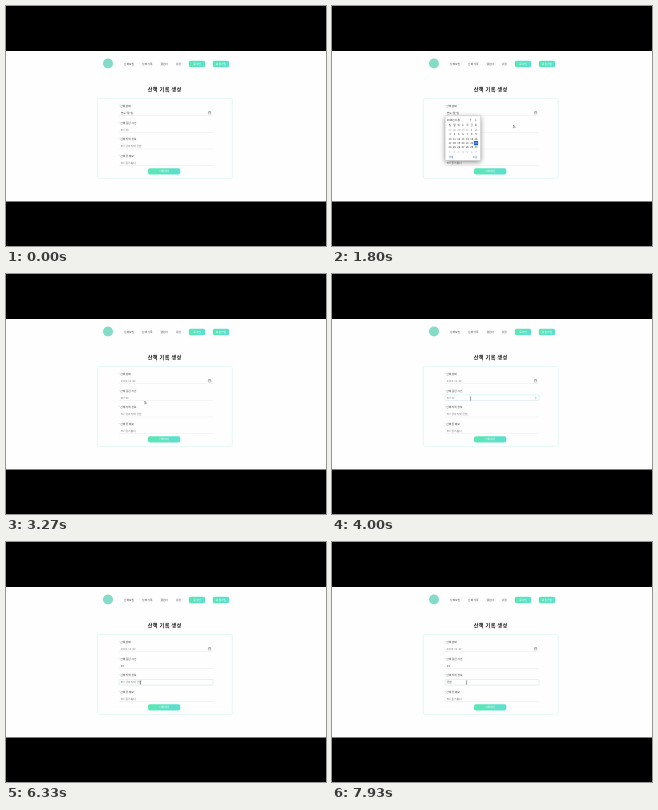
Recreate the animation shown at these times as an HTML page with a canvas. Size 320x240 px, loop 8 s.

```html
<!DOCTYPE html>
<html lang="ko">
<head>
<meta charset="utf-8">
<style>
html, body { margin: 0; width: 100%; height: 100%; overflow: hidden; background: #000; }
canvas { display: block; width: 320px; height: 240px; }
</style>
</head>
<body>
<canvas id="stage" width="320" height="240"></canvas>
<script>
const ctx = document.getElementById('stage').getContext('2d');
const LOOP = 8000;
const INK = '#333', MUTED = '#777', BLUE = '#1a5fd0';
const FONT = '"Noto Sans CJK KR", "Noto Sans CJK", "Noto Sans", sans-serif';

// Pointer stops: time, x, y
const pointerPath = [
  [0, 220, 112], [500, 204, 107], [1000, 204, 107], [1800, 181.5, 120.5],
  [2450, 139.5, 137], [2900, 139.5, 137], [3500, 138.5, 124.5],
  [5700, 138.5, 124.5], [6150, 134.5, 140.5], [8000, 134.5, 140.5]
];

function text(value, x, y, size, color = INK, align = 'left', weight = 400, spacing = 0) {
  ctx.font = `${weight} ${size}px ${FONT}`;
  ctx.letterSpacing = `${spacing}px`;
  ctx.textAlign = align;
  ctx.textBaseline = 'middle';
  ctx.fillStyle = color;
  ctx.fillText(value, x, y);
}

function box(x, y, w, h, r, fill, stroke, line = 0.6) {
  ctx.beginPath();
  ctx.roundRect(x, y, w, h, r);
  if (fill) { ctx.fillStyle = fill; ctx.fill(); }
  if (stroke) { ctx.strokeStyle = stroke; ctx.lineWidth = line; ctx.stroke(); }
}

function button(label, x, y, w, h) {
  const fill = ctx.createLinearGradient(x, y, x + w, y);
  fill.addColorStop(0, '#5ce6b4');
  fill.addColorStop(1, '#5cdfd0');
  box(x, y, w, h, 1.8, fill);
  text(label, x + w / 2, y + h / 2, 2.8, '#fff', 'center', 500);
}

function header() {
  ctx.beginPath();
  ctx.arc(102, 57.5, 5, 0, Math.PI * 2);
  ctx.fillStyle = '#84dcc8';
  ctx.fill();
  [['산책모임', 118], ['산책 기록', 136], ['캘린더', 154.5], ['상점', 169.8]]
    .forEach(([label, x]) => text(label, x, 57.9, 2.7, '#444'));
  button('로그인', 182.8, 54.8, 16.4, 6.4);
  button('회원가입', 206.8, 54.8, 16.4, 6.4);
}

function field(label, y, value, color, focused) {
  text('*', 112.6, y - 7, 2.5, '#5cbcae');
  text(label, 114.2, y - 7.2, 2.6, INK, 'left', 500, 0.1);
  if (focused) box(113, y - 2.9, 94, 5.6, 0.8, '#fff', '#c4eeee');
  ctx.fillStyle = '#eee';
  ctx.fillRect(113, y + 2.3, 94, 0.6);
  text(value, 114.8, y, 2.7, color, 'left', 400, 0.1);
}

function form(t) {
  box(91.3, 92.3, 135, 80, 2, null, '#d8f6f2', 0.7);
  const minutes = t < 5250 ? '' : t < 5650 ? '3' : '30';
  const place = t < 7000 ? '' : t < 7500 ? '공' : '공원';
  const editingMinutes = t >= 3600 && t < 6150;
  field('산책 날짜', 107, t < 2900 ? '연도-월-일' : '2024-11-22', t < 2900 ? '#444' : MUTED);
  field('산책 걸린 시간', 123.8, minutes || 'ex) 30', minutes ? INK : MUTED, editingMinutes);
  field('산책 지역 정보', 140.4, place || 'ex) 강아지와 공원', place ? INK : MUTED, t >= 6150);
  field('산책 중 메모', 157, 'ex) 즐거웠다', MUTED);

  box(202.4, 105.8, 2.4, 2.2, 0.2, null, '#777', 0.4);
  ctx.fillStyle = '#777';
  ctx.fillRect(202.4, 105.6, 2.4, 0.7);
  if (editingMinutes) text('↕', 204, 123.8, 2.8, '#777', 'center');

  button('기록하기', 142, 162.2, 32.3, 6.3);
}

function calendar(t) {
  ctx.save();
  ctx.shadowColor = '#0007';
  ctx.shadowBlur = 5;
  ctx.shadowOffsetY = 1.5;
  box(113.2, 109.7, 35.3, 44.8, 0.8, '#fff');
  ctx.restore();
  box(113.2, 109.7, 35.3, 44.8, 0.8, null, '#c6c6c6', 0.4);
  text('2024년 11월', 115, 113.8, 2.4, '#222', 'left', 500);
  text('↑', 139, 113.8, 2.8, INK, 'center');
  text('↓', 144, 113.8, 2.8, INK, 'center');

  const columnX = i => 118 + i * 4.33;
  [...'일월화수목금토'].forEach((day, i) => text(day, columnX(i), 119.2, 2.5, INK, 'center', 500));
  const hovered = t >= 2400;
  for (let i = 0; i < 42; i++) {
    const x = columnX(i % 7), y = 123.7 + Math.floor(i / 7) * 4.45;
    const day = i - 4, inMonth = day > 0 && day <= 30;
    const shown = day < 1 ? day + 31 : day > 30 ? day - 30 : day;
    const selected = day === 23, active = hovered && day === 22;
    if (selected || active) box(x - 2.1, y - 2.1, 4.2, 4.2, 0.5, active ? '#7d9fe0' : BLUE);
    text(shown, x, y, 2.6, selected || active ? '#fff' : inMonth ? '#222' : '#999', 'center', 500);
  }
  text('삭제', 119, 151.5, 2.4, BLUE, 'center');
  text('오늘', 143, 151.5, 2.4, BLUE, 'center');
}

function pointer(t) {
  const next = Math.max(1, pointerPath.findIndex(stop => stop[0] > t));
  const [t0, x0, y0] = pointerPath[next - 1], [t1, x1, y1] = pointerPath[next];
  const p = (t - t0) / (t1 - t0), e = p * p * (3 - 2 * p);
  const x = x0 + (x1 - x0) * e, y = y0 + (y1 - y0) * e;
  ctx.strokeStyle = '#555';
  ctx.lineWidth = 0.45;
  if (t >= 3400) {
    ctx.beginPath();
    ctx.moveTo(x - 0.7, y - 1.6); ctx.lineTo(x + 0.7, y - 1.6);
    ctx.moveTo(x, y - 1.6); ctx.lineTo(x, y + 1.6);
    ctx.moveTo(x - 0.7, y + 1.6); ctx.lineTo(x + 0.7, y + 1.6);
    ctx.stroke();
  } else if (t > 250) {
    ctx.beginPath();
    ctx.moveTo(x, y - 1.5); ctx.lineTo(x, y + 1.5); ctx.lineTo(x + 0.8, y + 0.8);
    ctx.lineTo(x + 1.8, y + 0.8); ctx.closePath();
    ctx.fillStyle = '#fff';
    ctx.fill();
    ctx.stroke();
  }
}

function draw(now) {
  const t = now % LOOP;
  ctx.fillStyle = '#000';
  ctx.fillRect(0, 0, 320, 240);
  ctx.fillStyle = '#fefefe';
  ctx.fillRect(0, 45, 320, 150.5);
  header();
  text('산책 기록 생성', 158.7, 82.6, 5.1, '#111', 'center', 700, 0.45);
  form(t);
  if (t >= 1000 && t < 2900) calendar(t);
  pointer(t);
  requestAnimationFrame(draw);
}
requestAnimationFrame(draw);
</script>
</body>
</html>
```
